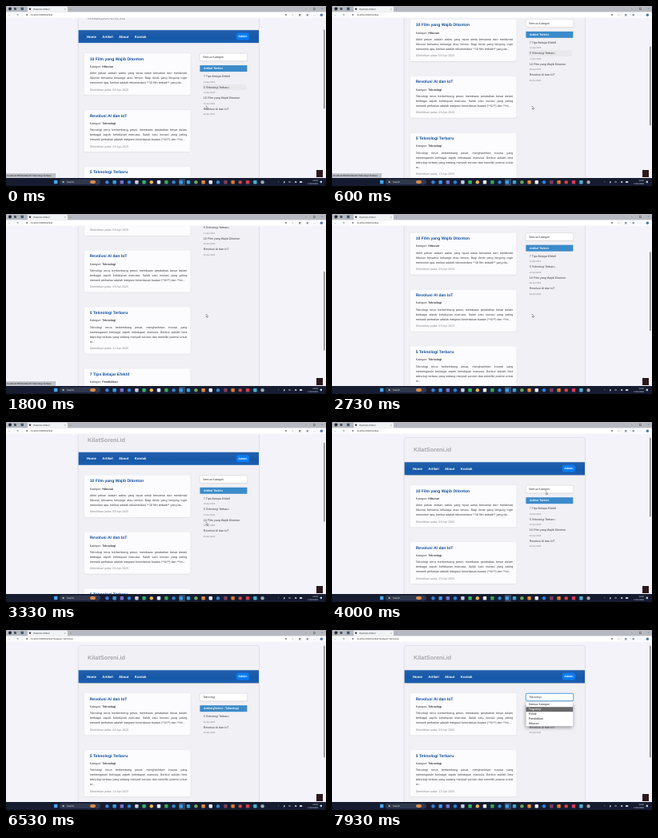
These frames come from a looping animation (400x225 px, 8 s). An HTML page:

```html
<!DOCTYPE html>
<html lang="id">
<head>
<meta charset="utf-8">
<title>Halaman Artikel</title>
<style>
  /* 1rem is one stage pixel: laid out at 5x, then scaled down for precise small type */
  html { font-size: 5px; }
  html, body { margin: 0; width: 100%; height: 100%; overflow: hidden; }
  #stage { position: absolute; left: 0; top: 0; width: 400rem; height: 225rem; overflow: hidden;
    transform: scale(.2); transform-origin: 0 0; background: #f4f3fa; color: #3c3c42;
    font: 3.66rem/6rem "Liberation Sans", Arial, sans-serif; text-rendering: geometricPrecision; }
  #stage div { position: absolute; white-space: nowrap; box-sizing: border-box; }
  #view { left: 0; top: 15rem; width: 400rem; height: 200rem; overflow: hidden; }
  #page { left: 0; top: -15rem; width: 396rem; }
  .container { background: #f0f0f5; border-radius: 2rem; box-shadow: 0 0 2rem #0004; }
  .brand { font-weight: bold; font-size: 7.3rem; color: #a6a6ac; }
  .nav { background: linear-gradient(#2360ad, #1658a8 60%, #1c5fb2); box-shadow: 0 .3rem 1rem #0003; }
  .link { color: #fff; font-weight: bold; font-size: 4.3rem; }
  .admin { background: #087cf5; color: #fff; border-radius: 2.5rem; font: bold 3.6rem/9rem "Liberation Sans", sans-serif; text-align: center; }
  .card { background: #fcfcfe; border-radius: 2rem; box-shadow: 0 .4rem 1.5rem #0002; }
  .title { color: #124f9e; font-weight: bold; font-size: 5.05rem; }
  .line { text-align: justify; text-align-last: justify; }
  .last { text-align: left; text-align-last: left; }
  .date { color: #8b8b90; }
  .small { font-size: 2.7rem; color: #77777c; }
  .heading { background: #3b8bca; color: #fff; font: bold 3.62rem/8rem "Liberation Sans", sans-serif; padding-left: 4.6rem; }
  .hover { background: #e9e9ec; }
  .select { background: #fff; border: .5rem solid #c9c9ce; border-radius: 2rem; line-height: 9rem; padding-left: 3.5rem; box-shadow: 0 .3rem 1rem #0002; }
  .select.focus { border: .8rem solid #4b9fdc; box-shadow: 0 0 1.2rem #4b9fdc; padding-left: 3.2rem; line-height: 8.4rem; }
  .popup { background: #fff; border: .3rem solid #bbb; box-shadow: 0 2rem 5rem #0007; }
  .option { padding-left: 3.2rem; line-height: 5.9rem; color: #222; }
  .picked { background: #696969; color: #fff; }
  .tiny { font-size: 2.9rem; color: #333; }
  .status { background: #bfc2ca; border: .3rem solid #999; font-size: 3rem; line-height: 4.6rem; padding-left: 1rem; color: #222; }
  .taskbar { background: #151c30; }
  .light { color: #e6e9f0; font-size: 2.9rem; }
  .clock { width: 16rem; font-size: 2.6rem; line-height: 5rem; text-align: right; }
  svg { position: absolute; }
</style>
</head>
<body>
<div id="stage">
  <div id="view"><div id="page"></div></div>
  <div id="chrome"></div>
  <svg id="cursor" viewBox="0 0 8 12" style="left:0;top:0;width:3.6rem;height:5.4rem">
    <path d="M1 1v9l2-2 1.5 3 1.5-.7-1.5-2.8h3z" fill="#fff" stroke="#222" stroke-width=".8"/>
  </svg>
</div>
<script>
const DURATION = 8000;
const $ = id => document.getElementById(id);
const box = (cls, x, y, w, h, html = '', style = '') =>
  `<div class="${cls}" style="left:${x}rem;top:${y}rem;${w ? `width:${w}rem;` : ''}${h ? `height:${h}rem;` : ''}${style}">${html}</div>`;
const fill = (color, x, y, w, h, radius = 0) => box('', x, y, w, h, '', `background:${color};border-radius:${radius}rem`);
// Single line of text, vertically centred on y
const text = (cls, x, y, html) => box(cls, x, y - 3, 0, 6, html);

const articles = {
  film: { title: '10 Film yang Wajib Ditonton', category: 'Hiburan', date: '09 Apr 2025', lines: [
    'Akhir pekan adalah waktu yang tepat untuk bersantai dan menikmati',
    'hiburan bersama keluarga atau teman. Bagi Anda yang bingung ingin',
    'menonton apa, berikut adalah rekomendasi **10 film terbaik** yang da...'] },
  ai: { title: 'Revolusi AI dan IoT', category: 'Teknologi', date: '09 Apr 2025', lines: [
    'Teknologi terus berkembang pesat, membawa perubahan besar dalam',
    'berbagai aspek kehidupan manusia. Salah satu inovasi yang paling',
    'menarik perhatian adalah integrasi kecerdasan buatan (**AI**) dan **Int...'] },
  tech: { title: '5 Teknologi Terbaru', category: 'Teknologi', date: '13 Apr 2025', lines: [
    'Teknologi terus berkembang pesat, menghadirkan inovasi yang',
    'memengaruhi berbagai aspek kehidupan manusia. Berikut adalah lima',
    'teknologi terbaru yang sedang menjadi sorotan dan memiliki potensi untuk',
    'm...'] },
  tips: { title: '7 Tips Belajar Efektif', category: 'Pendidikan', date: '13 Apr 2025', lines: [
    'Belajar efektif adalah kunci untuk meraih hasil yang baik di sekolah',
    'maupun di tempat kerja. Berikut adalah tujuh tips yang dapat Anda',
    'terapkan agar waktu belajar menjadi lebih bermanfaat...'] }
};
const options = ['Semua Kategori', 'Teknologi', 'Politik', 'Pendidikan', 'Hiburan'];

function card({ title, category, date, lines }, y) {
  const extra = (lines.length - 3) * 6;
  return box('card', 97.5, y, 133, 52.3 + extra) +
    text('title', 104.7, y + 7, title) +
    text('', 104.7, y + 16.8, `Kategori: <b>${category}</b>`) +
    lines.map((line, i) => box(i < lines.length - 1 ? 'line' : 'line last', 104.7, y + 22.2 + i * 6, 121.6, 6, line)).join('') +
    text('date', 104.7, y + 45.6 + extra, `Diterbitkan pada: ${date}`);
}

function pageHtml({ filtered, open, hover }) {
  const cards = filtered ? ['ai', 'tech'] : ['film', 'ai', 'tech', 'tips'];
  const recent = filtered ? ['tech', 'ai'] : ['tips', 'tech', 'film', 'ai'];
  let html = box('container', 90.5, 20, 225.5, filtered ? 240 : 362) +
    text('brand', 102, 35, 'KilatSoreni.id') +
    box('nav', 90.5, 50.2, 225.5, 16) +
    [['Home', 101], ['Artikel', 120.3], ['About', 141], ['Kontak', 160.8]].map(([label, x]) => text('link', x, 58.2, label)).join('') +
    box('admin', 287.7, 53.5, 16.3, 9, 'Admin');

  let y = 79;
  for (const key of cards) {
    html += card(articles[key], y);
    y += 70.9 + (articles[key].lines.length - 3) * 6;
  }

  html += box('select' + (open ? ' focus' : ''), 242, 79, 60, 10, filtered ? 'Teknologi' : 'Semua Kategori') +
    box('heading', 242.3, 94.2, 59, 8, 'Artikel Terkini' + (filtered ? ' : Teknologi' : ''));
  recent.forEach((key, i) => {
    const itemY = 108 + i * 13.5;
    if (hover && key === 'tech') html += box('hover', 246, itemY - 3.8, 54, 7.4);
    html += text('', 246.8, itemY, articles[key].title) + text('small', 246.8, itemY + 6.9, articles[key].date);
  });

  if (open) html += box('popup', 242.3, 89.8, 59, 30.4) + options.map((label, i) =>
    box('option' + (label === 'Teknologi' ? ' picked' : ''), 242.6, 90.1 + i * 6, 58.4, 6, label)).join('');
  return html;
}

function chromeHtml({ filtered, linkHint }) {
  const apps = ['#3f7fd0', '#3b9be0', '#7a6fd0', '#2f7fd6', '#c8ced8', '#30b566', '#e8b84a', '#e9edf2', '#35a65a', '#2b85c8', '#3a9ae0',
    '#37a3cf', '#6aa65a', '#e28a3a', '#e9edf2', '#2a86d8', '#7c3f58', '#e07a30', '#d84040', '#d03c50', '#48b4d0', '#a0a8b4'];
  return fill('#b6b9bf', 0, 0, 400, 7.5) + fill('#f8fafc', 0, 7.5, 400, 7.5) +
    fill('#222b38', 3, 1.5, 4, 4, 2) + fill('#4d5763', 10, 2, 3, 3, .6) + fill('#3d5b78', 18.5, 1.8, 3.4, 3.4, .6) +
    fill('#f0f2f4', 27, .8, 50, 7, 1) + fill('#333a44', 28.7, 2.6, 2.4, 2.4, 1.2) +
    text('tiny', 34, 4, 'Halaman Artikel') + text('tiny', 73, 4, '×') + text('tiny', 80, 4, '+') +
    text('tiny', 374, 3.5, '–') + fill('#444', 384, 2.3, 2.4, 2.4) + fill('#b6b9bf', 384.4, 2.7, 1.6, 1.6) + text('tiny', 394.5, 3.5, '×') +
    text('tiny', 3, 11, '←') + text('tiny', 13.5, 11, '↻') +
    fill('#fff', 21, 8.4, 337, 5.6, 2.8) + fill('#777', 25, 10, 2, 2, 1) +
    text('tiny', 31, 11.3, 'localhost:8000/artikel' + (filtered ? '?kategori=teknologi' : '')) +
    fill('#777', 349, 10, 2, 2, 1) + text('tiny', 357, 11, '☆') + fill('#8a9098', 366, 10, 2.4, 2.4, .5) +
    fill('#8a9098', 375.5, 10, 2.4, 2.4, 1.2) + text('tiny', 384, 11, '…') + fill('#4f78a8', 392.5, 9.6, 3.4, 3.4, 1.7) +
    fill('#f3f3f6', 396, 15, 4, 200) +
    `<div id="thumb" style="left:397rem;width:1.6rem;height:${filtered ? 140 : 99}rem;background:#8b8b90;border-radius:.8rem"></div>` +
    fill('#2c191c', 388, 205, 8, 9) +
    (linkHint ? box('status', 0, 209.4, 62, 5.2, 'localhost:8000/artikel/5-Teknologi-Terbaru') : '') +
    box('taskbar', 0, 215, 400, 10) +
    fill('#4aa6ea', 60, 217.8, 4.4, 4.4) + fill('#30384c', 67, 216.8, 51, 6.4, 3.2) +
    fill('#c8ced8', 70.5, 219, 2, 2, 1) + text('light', 76, 220.2, 'Search') + fill('#d98a50', 105, 218, 7, 4, 2) +
    fill('#39435a', 216, 216, 8, 8.4, 1) +
    apps.map((color, i) => fill(color, 124.1 + i * 9.25, 217.9, 4.4, 4.4, i % 3 ? .8 : 2.2)).join('') +
    text('light', 340, 220, '^') + fill('#c8ced8', 347, 219, 1.6, 2.4, .8) + text('light', 353, 220, 'IN') +
    fill('#c8ced8', 361, 219, 2.4, 2, 1) + fill('#c8ced8', 367, 219, 3.2, 2) +
    box('light clock', 374, 215.4, 0, 5, '08.48') + box('light clock', 374, 219.4, 0, 5, '17/04/2025') +
    fill('#c8ced8', 392.5, 218.6, 2.4, 2.6, 1.2);
}

// Keys are [time, ...values]; linear unless smoothed
function track(keys, t, smooth) {
  const next = keys.findIndex(key => key[0] > t);
  if (next < 0) return keys.at(-1).slice(1);
  const a = keys[next - 1], b = keys[next];
  let p = (t - a[0]) / (b[0] - a[0]);
  if (smooth) p = p * p * (3 - 2 * p);
  return a.slice(1).map((value, i) => value + (b[i + 1] - value) * p);
}
const scrollKeys = [[0, 20], [600, 62.3], [1180, 104.5], [2050, 104.5], [3330, 12.5], [3500, 0]];
const cursorKeys = [[0, 249.5, 124.5], [3500, 249.5, 124.5], [4100, 268, 83], [4500, 268, 83], [4800, 258, 97],
  [5300, 258, 96], [6900, 258, 96], [7300, 264, 83], [7450, 264, 83], [7750, 250, 97]];

let shown = '';
function frame(now) {
  const t = now % DURATION;
  const state = {
    filtered: t >= 5300,
    open: (t >= 4400 && t < 5250) || t >= 7400,
    hover: t < 1180,
    linkHint: t < 2050
  };
  const key = JSON.stringify(state);
  if (key !== shown) {
    shown = key;
    $('page').innerHTML = pageHtml(state);
    $('chrome').innerHTML = chromeHtml(state);
  }
  const [scroll] = track(scrollKeys, t);
  const [x, y] = track(cursorKeys, t, true);
  $('page').style.transform = `translateY(${-scroll}rem)`;
  $('thumb').style.top = `${19.5 + scroll * .5}rem`;
  $('cursor').style.transform = `translate(${x}rem, ${y}rem)`;
  requestAnimationFrame(frame);
}
frame(performance.now());
</script>
</body>
</html>
```
